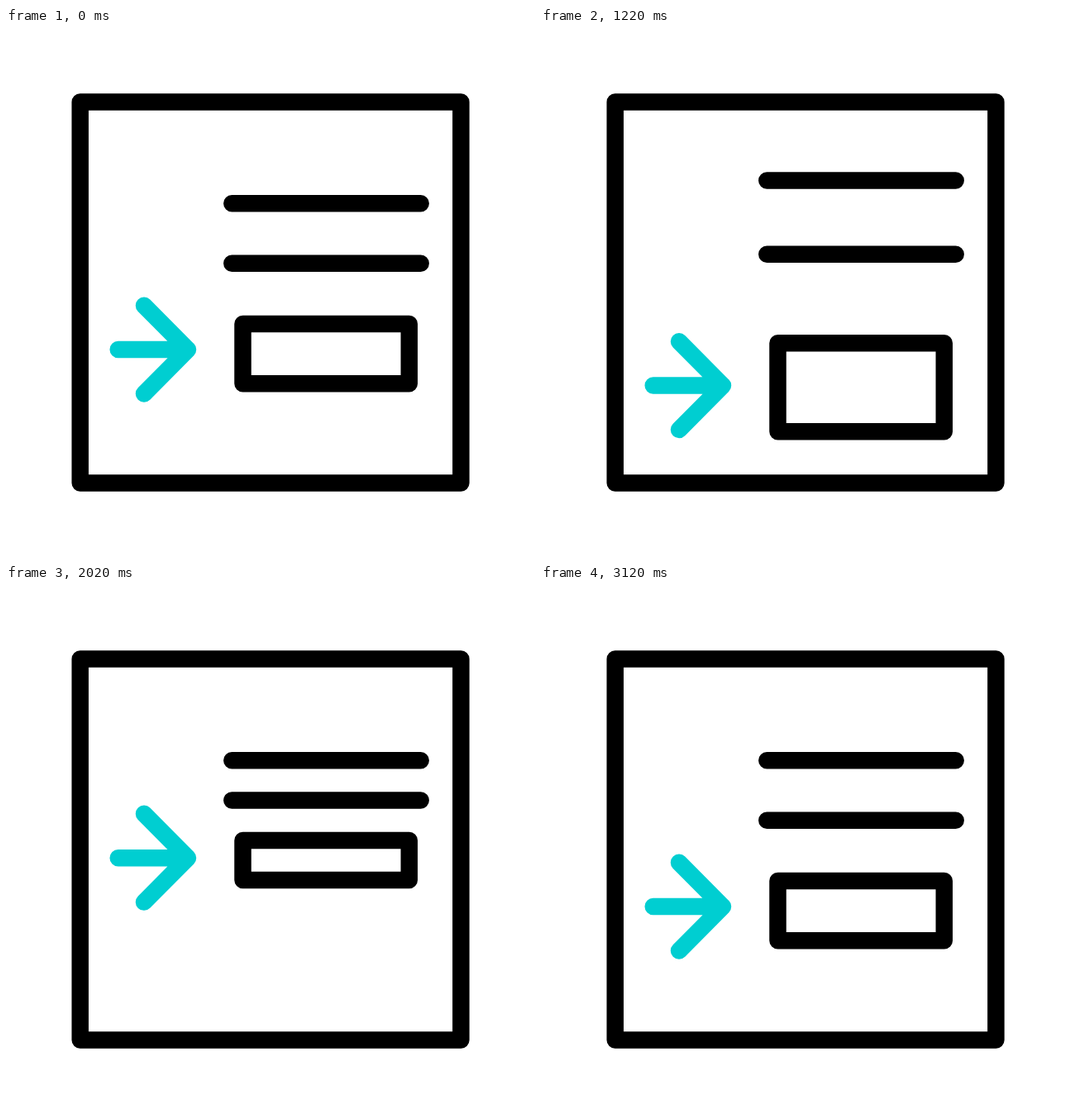
An HTML page that plays this animation: 640 px wide and 640 px high, repeating every 3.6 s.

```html
<!DOCTYPE html>
<html lang="en">
<head>
<meta charset="utf-8">
<title>Insert row</title>
<style>
html, body { margin: 0; height: 100%; overflow: hidden; background: #fff; }
svg { display: block; width: 100%; height: 100%; }
path { fill: none; stroke: #000; stroke-width: 20.5; stroke-linecap: round; stroke-linejoin: round; }
#arrow { stroke: #00ced1; }
</style>
</head>
<body>
<svg viewBox="0 0 640 640">
  <path d="M89.7 89.5H550.4V550.4H89.7Z"/>
  <path id="rows"/>
  <path id="arrow" d="M135.7 0H220M167 -53.4L220 0L167 53.4"/>
</svg>
<script>
const LOOP = 3600, STEP = 20;
const rows = document.getElementById('rows');
const arrow = document.getElementById('arrow');

// Heights of line 1, line 2, box top, box bottom, arrow
const normal = [212.3, 284.7, 357.9, 430.2, 389.1];
const tall = [184.5, 273.8, 381.4, 488.4, 432.7];
const compact = [212.3, 260.5, 309, 357.1, 330.2];

function bezier(x1, y1, x2, y2) {
  const at = (a, b, s) => 3 * a * s * (1 - s) ** 2 + 3 * b * s * s * (1 - s) + s ** 3;
  return x => {
    if (x <= 0 || x >= 1) return x <= 0 ? 0 : 1;
    let lo = 0, hi = 1;
    for (let i = 0; i < 24; i++) {
      const mid = (lo + hi) / 2;
      if (at(x1, x2, mid) < x) lo = mid; else hi = mid;
    }
    return at(y1, y2, lo);
  };
}

const easeInOut = bezier(.5, 0, .5, 1);
const easeOut = bezier(1 / 3, 1 / 3, 2 / 3, 1);

const moves = [
  { start: 0, end: 700, from: normal, to: tall, ease: easeInOut },
  { start: 1200, end: 2020, from: tall, to: compact, ease: easeInOut },
  { start: 2420, end: 3120, from: compact, to: normal, ease: easeOut }
];

function draw(now) {
  const t = Math.floor(now % LOOP / STEP) * STEP;
  const { start, end, from, to, ease } = moves.findLast(m => t >= m.start);
  const x = (t - start) / (end - start);
  const mix = (i, f) => from[i] + (to[i] - from[i]) * f(x);
  const [line1, line2, top, bottom] = [0, 1, 2, 3].map(i => mix(i, ease));
  rows.setAttribute('d',
    `M273.3 ${line1}H501.7M273.3 ${line2}H501.7M286.5 ${top}H487.8V${bottom}H286.5Z`);
  arrow.setAttribute('transform', `translate(0 ${mix(4, easeInOut)})`);
}

let origin;
function tick(now) {
  origin ??= now;
  draw(now - origin);
  requestAnimationFrame(tick);
}
draw(0);
requestAnimationFrame(tick);
</script>
</body>
</html>
```
